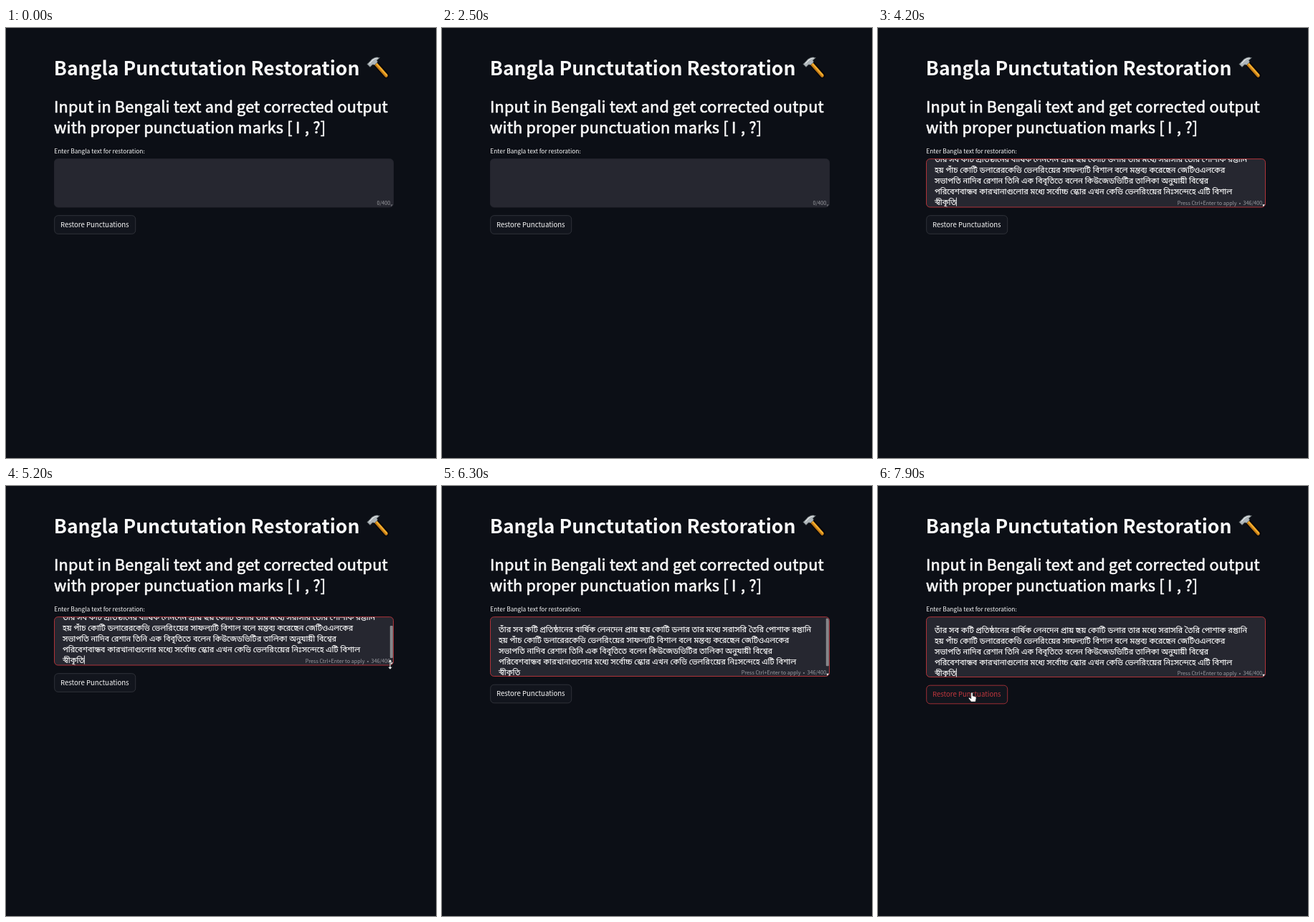
Animation, 600 px wide and 600 px high, one loop 8 s. Source, as an HTML page:

```html
<!DOCTYPE html>
<html lang="en">
<head>
<meta charset="utf-8">
<title>Bangla Punctuation Restoration</title>
<style>
  html, body { margin: 0; width: 100%; height: 100%; overflow: hidden; background: #0c0f16; }
  svg { display: block; width: 100vw; height: 100vh; }
  text { font-family: "Noto Sans CJK JP", "Noto Sans CJK SC", "Noto Sans CJK", "Open Sans", sans-serif; fill: #fafafa; white-space: pre; }
  .title { font-size: 26.55px; font-weight: 700; }
  .heading { font-size: 21.67px; letter-spacing: .19px; stroke: #fafafa; stroke-width: .65px; stroke-linejoin: round; }
  .label { font-size: 8.4px; }
  .button { font-size: 9.6px; }
  .hint { font-size: 7.22px; fill: #9b9ca2; }
  .bangla { font-family: "Noto Sans Bengali", "Noto Sans", sans-serif; font-size: 10.95px; stroke: #fafafa; stroke-width: .15px; }
</style>
</head>
<body>
<svg viewBox="0 0 600 600">
  <defs>
    <clipPath id="clip"><rect id="clipBox" x="68" y="183" width="472" height="67" rx="5"/></clipPath>
  </defs>
  <rect width="600" height="600" fill="#0c0f16"/>

  <text class="title" x="66.8" y="66">Bangla Punctutation Restoration</text>
  <g id="hammer" transform="translate(-.5 0)" stroke-linecap="round" stroke-linejoin="round">
    <path d="M515 48L531 66" stroke="#05060a" stroke-width="8" fill="none"/>
    <path d="M514.5 48L531 66.5" stroke="#c27a16" stroke-width="4.6" fill="none"/>
    <path d="M515.5 47.5L531.5 65.5" stroke="#f2ab2c" stroke-width="2.6" fill="none"/>
    <path d="M504.5 50.5L508.5 54.5L512 51L515 51.5L519 47.5L518 45L522 41.5Q516 39.5 511 43.5L508 47Z" fill="#aeb5b9" stroke="#4e5559" stroke-width=".7"/>
    <path d="M508 49L513 44Q516 42 519 42" fill="none" stroke="#e3e6e7" stroke-width="1.2"/>
  </g>

  <text class="heading" x="67" y="118.3">Input in Bengali text and get corrected output</text>
  <text class="heading" x="67" y="147.3">with proper punctuation marks [</text>
  <text class="heading" x="404" y="147.3">I</text>
  <text class="heading" x="417" y="147.3">, ?]</text>
  <text class="label" x="67.3" y="175">Enter Bangla text for restoration:</text>

  <rect id="field" x="67.5" y="182.7" width="473" height="67.3" rx="5" fill="#262730" stroke-width=".9"/>
  <g clip-path="url(#clip)">
    <g id="lines"></g>
    <rect id="scrollbar" x="535.8" width="4" rx="1" fill="#85868a"/>
  </g>
  <rect id="caret" width=".9" fill="#fafafa"/>
  <text id="hint" class="hint" x="536.3" text-anchor="end"></text>
  <path id="grip" d="M536.5 -2.5H540L537.5 .5Z"/>

  <g id="button">
    <rect x="67.7" y="261.7" width="113" height="25.6" rx="5" fill="#12151d" stroke-width=".8"/>
    <text class="button" x="76" y="277.8">Restore Punctuations</text>
  </g>

  <g id="arrow">
    <path d="M0 0H4.5L1 4.5Z" fill="#1b1c22" stroke="#eee" stroke-width=".8"/>
    <ellipse cx="9.5" cy="10.5" rx="4.3" ry="9" fill="#e8c93c"/>
  </g>
  <path id="resizer" d="M0 -7L3 -3.5H.8V3.5H3L0 7L-3 3.5H-.8V-3.5H-3Z" fill="#fff" stroke="#111" stroke-width=".5"/>
  <path id="hand" d="M-1.2 .8Q0 -.8 1.2 .8V5L5 6Q6.3 6.6 6 8L5 13H-1L-4.5 8.5Q-4.5 6.8 -2.8 7.4L-1.2 9Z" fill="#fff" stroke="#222" stroke-width=".5"/>
</svg>
<script>
const LOOP = 8000;
const RED = '#c0373d';
const $ = id => document.getElementById(id);
const set = (el, attrs) => Object.entries(attrs).forEach(([key, value]) => el.setAttribute(key, value));
const show = (el, on) => set(el, { visibility: on ? 'visible' : 'hidden' });
const moveTo = (el, x, y) => set(el, { transform: `translate(${x} ${y})` });
const between = (t, a, b) => t >= a && t < b;

const paragraph = [
  'তাঁর সব কটি প্রতিষ্ঠানের বার্ষিক লেনদেন প্রায় ছয় কোটি ডলার তার মধ্যে সরাসরি তৈরি পোশাক রপ্তানি',
  'হয় পাঁচ কোটি ডলারেরকেভি ভেলরিংয়ের সাফল্যটি বিশাল বলে মন্তব্য করেছেন জেটিওএলকের',
  'সভাপতি নাদিব রেশান তিনি এক বিবৃতিতে বলেন কিউজেডভিটির তালিকা অনুযায়ী বিশ্বের',
  'পরিবেশবান্ধব কারখানাগুলোর মধ্যে সর্বোচ্চ স্কোর এখন কেভি ভেলরিংয়ের নিঃসন্দেহে এটি বিশাল',
  'স্বীকৃতি'
];
paragraph.forEach((line, i) => {
  const text = document.createElementNS('http://www.w3.org/2000/svg', 'text');
  set(text, { class: 'bangla', x: 79, y: 205 + i * 15 });
  text.textContent = line;
  $('lines').append(text);
});

// Each key is [time, ...values]; values ease from key to key.
function track(keys, t) {
  if (t <= keys[0][0]) return keys[0].slice(1);
  const i = keys.findIndex(key => key[0] > t);
  if (i < 0) return keys[keys.length - 1].slice(1);
  const [a, b] = [keys[i - 1], keys[i]];
  const p = (t - a[0]) / (b[0] - a[0]);
  const eased = p * p * (3 - 2 * p);
  return a.slice(1).map((v, k) => v + (b[k + 1] - v) * eased);
}

const FOCUS = 3100, PASTE = 3900;
const SHORT = 250, TALL = 266.5, MAX_SCROLL = 18;
const bottomKeys = [[5500, SHORT], [6200, 265.5], [6300, 265.5], [6400, TALL]];
const enterKeys = [[2800, 190, 222], [3100, 96, 195]];
const reachKeys = [[4300, 300, 300], [4600, 470, 258], [4800, 550, 256], [5000, 536, 249]];
const leaveKeys = [[6500, 520, 280], [6900, 330, 296], [7300, 172, 292], [7600, 131, 288]];

function render(t) {
  const focused = t >= FOCUS, pasted = t >= PASTE;
  const [bottom] = track(bottomKeys, t);
  const scroll = MAX_SCROLL * (TALL - bottom) / (TALL - SHORT);

  set($('field'), { height: bottom - 182.7, stroke: focused ? RED : '#262730' });
  set($('clipBox'), { height: bottom - 183.4 });
  show($('lines'), pasted);
  moveTo($('lines'), 0, -scroll);

  show($('scrollbar'), between(t, 4900, 6900));
  set($('scrollbar'), { y: 184 + scroll * 0.61, height: 68 - scroll * 1.27 });

  const caretOn = pasted
    ? (t < 5500 || (t > 6400 && (t - 6400) % 1000 < 500) || t >= 7800)
    : focused && (t - FOCUS) % 1000 < 500;
  show($('caret'), caretOn);
  set($('caret'), pasted
    ? { x: 108.9, y: 254.5 - scroll, height: 12 }
    : { x: 78.6, y: 195, height: 13 });

  $('hint').textContent = pasted ? 'Press Ctrl+Enter to apply  •  346/400' : '0/400';
  set($('hint'), { y: bottom - 3 });
  moveTo($('grip'), 0, bottom - 1.3);
  set($('grip'), { fill: pasted ? '#f4f4f4' : '#62636a' });

  const pointer = t < 4000 ? track(enterKeys, t)
    : t < 6400 ? track(reachKeys, t) : track(leaveKeys, t);
  const [px, py] = pointer;
  const hover = t >= 6500 && px < 181 && py > 278;
  show($('arrow'), between(t, 2800, 3800) || between(t, 4300, 5000) || (t >= 6500 && !hover));
  moveTo($('arrow'), px, py);
  show($('resizer'), between(t, 5000, 6200));
  moveTo($('resizer'), 536, bottom - 1);
  show($('hand'), hover);
  moveTo($('hand'), px, py);

  const [box, caption] = $('button').children;
  moveTo($('button'), 0, bottom - SHORT);
  set(box, { stroke: hover ? RED : '#383a42' });
  caption.style.fill = hover ? RED : '#fafafa';
}

const start = performance.now();
function tick() {
  render((performance.now() - start) % LOOP);
  requestAnimationFrame(tick);
}
tick();
</script>
</body>
</html>
```
